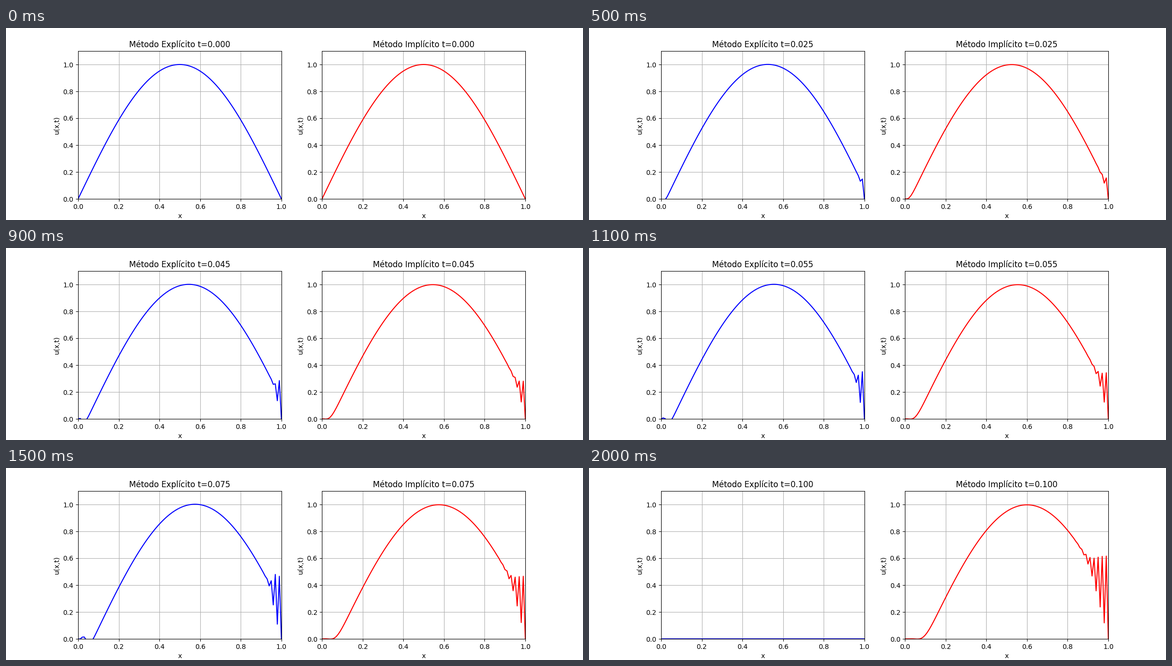
These frames come from a looping animation (1200x400 px, 2100 ms). A matplotlib script:

```python
import numpy as np
import matplotlib.pyplot as plt
from matplotlib.animation import FuncAnimation

NX, NT = 101, 21
DT = 0.005
x = np.linspace(0, 1, NX)
k = DT / (2 * (x[1] - x[0]))


def solve_explicit():
    """Forward Euler with central differences; the last row stays at zero."""
    u = np.zeros((NT, NX))
    u[0] = np.sin(np.pi * x)
    for n in range(NT - 2):
        u[n + 1, 1:-1] = u[n, 1:-1] - k * (u[n, 2:] - u[n, :-2])
    return u


def solve_implicit():
    """Backward Euler with central differences and fixed ends."""
    a = np.eye(NX)
    for i in range(1, NX - 1):
        a[i, i - 1], a[i, i + 1] = -k, k
    u = np.zeros((NT, NX))
    u[0] = np.sin(np.pi * x)
    for n in range(NT - 1):
        rhs = u[n].copy()
        rhs[0] = rhs[-1] = 0
        u[n + 1] = np.linalg.solve(a, rhs)
    return u


fig, axes = plt.subplots(1, 2, figsize=(12, 4), dpi=100)
panels = []
for ax, name, color, u in zip(
    axes,
    ("Método Explícito", "Método Implícito"),
    ("b", "r"),
    (solve_explicit(), solve_implicit()),
):
    (line,) = ax.plot(x, u[0], color=color)
    ax.set_xlim(0, 1)
    ax.set_ylim(0, 1.1)
    ax.set_xlabel("x")
    ax.set_ylabel("u(x,t)")
    ax.grid(True)
    panels.append((ax, name, line, u))


def update(n):
    for ax, name, line, u in panels:
        line.set_ydata(u[n])
        ax.set_title(f"{name} t={n * DT:.3f}")
    return [p[2] for p in panels]


anim = FuncAnimation(fig, update, frames=NT, interval=100, repeat=True, repeat_delay=0)
plt.show()
```
